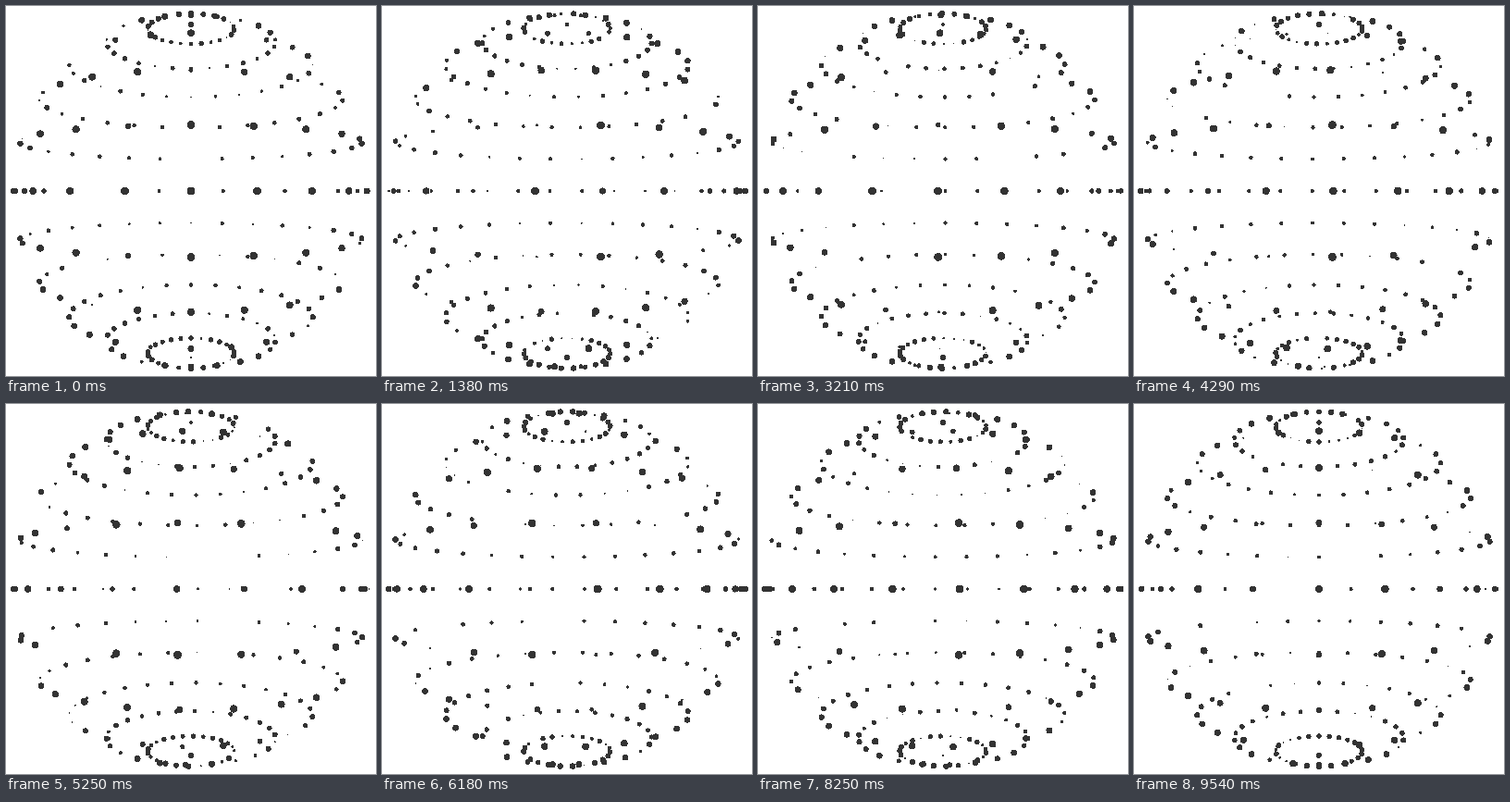
Write an HTML page that moves like this. It is 400 px wide and 400 px high and loops after 9.57 s.

```html
<!DOCTYPE html>
<html lang="en">
<head>
<meta charset="utf-8">
<title>Dotted sphere</title>
<style>
  html, body { margin: 0; width: 100%; height: 100%; overflow: hidden; background: #fff; }
  svg { display: block; width: 400px; height: 400px; }
</style>
</head>
<body>
<svg id="stage" viewBox="0 0 400 400" fill="#333" shape-rendering="crispEdges"></svg>
<script>
const stage = document.getElementById('stage');
const CENTER = 200, RADIUS = 180, DISTANCE = 500, DOT = 2.9;
const STEP = Math.PI / 12;            // 15 degrees between neighbours
const TICK = 30, TICKS = 319;         // loop of 9570 ms
const PULSE = 2000;                   // one shrink-and-grow cycle

let seed = 7;
function random() {
  seed = (seed * 16807) % 2147483647;
  return seed / 2147483647;
}

const dots = [];
for (let row = 0; row <= 12; row++) {
  const count = row % 12 ? 24 : 1;    // a single dot at each pole
  for (let col = 0; col < count; col++) {
    const circle = document.createElementNS('http://www.w3.org/2000/svg', 'circle');
    stage.append(circle);
    dots.push({ circle, polar: row * STEP, turn: col * STEP, delay: random() });
  }
}

// Stays near full size for most of the cycle, with a short dip to nothing.
function pulse(cycle) {
  const u = Math.abs(2 * (cycle % 1) - 1);
  return 1 - (1 - u) ** 4;
}

function draw(now) {
  const tick = Math.floor(now / TICK) % TICKS;
  const spin = tick / (TICKS - 1) * 2 * Math.PI;
  for (const { circle, polar, turn, delay } of dots) {
    const ring = RADIUS * Math.sin(polar);
    const angle = turn - spin;
    const scale = DISTANCE / (DISTANCE - ring * Math.cos(angle));
    circle.setAttribute('cx', CENTER + ring * Math.sin(angle) * scale);
    circle.setAttribute('cy', CENTER - RADIUS * Math.cos(polar) * scale);
    circle.setAttribute('r', DOT * scale * pulse(tick * TICK / PULSE + delay));
  }
}

const start = performance.now();
function loop() {
  draw(performance.now() - start);
  requestAnimationFrame(loop);
}
loop();
</script>
</body>
</html>
```
